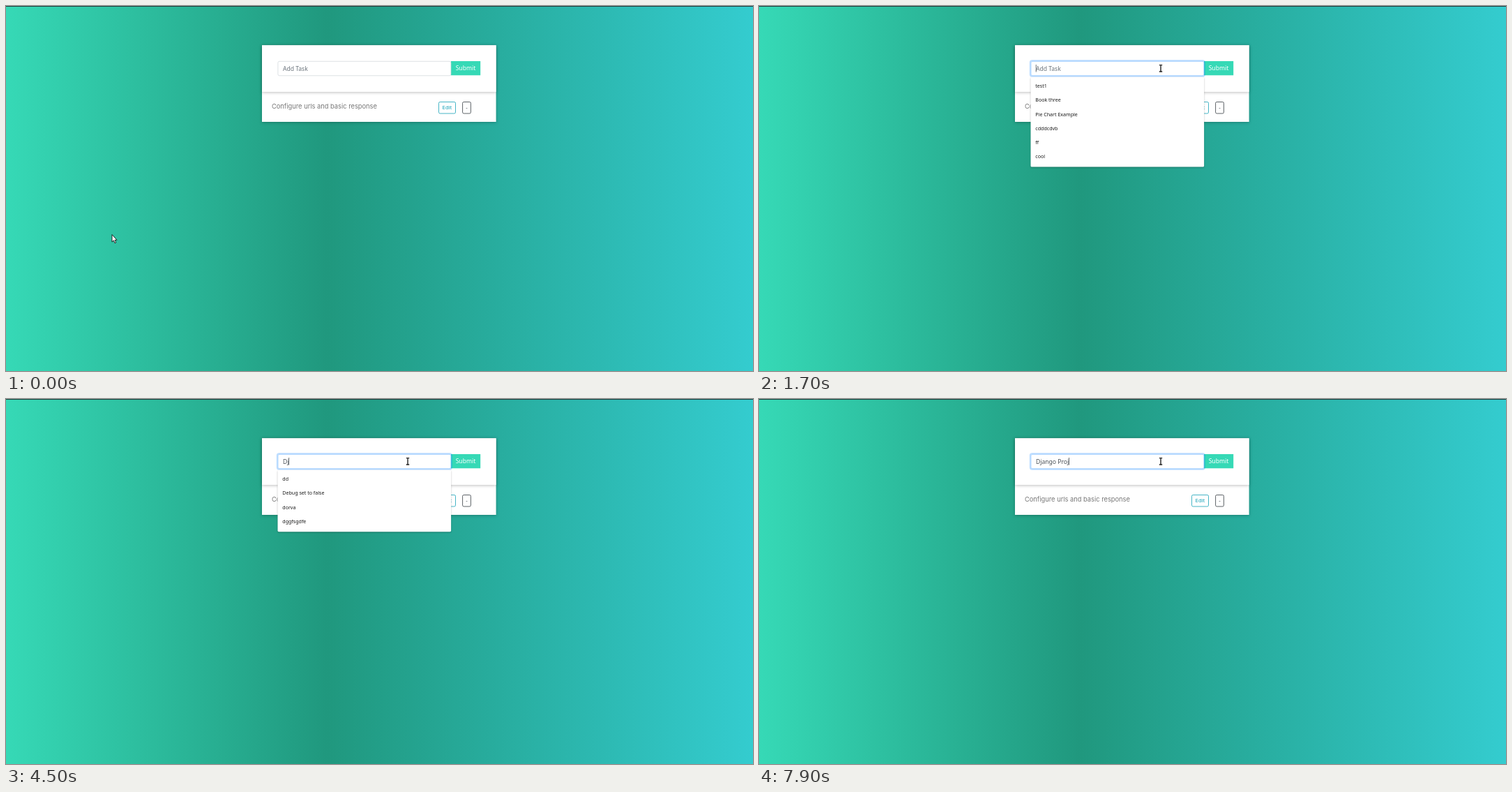
Animation, 1071 px wide and 523 px high, one loop 8000 ms. Source, as an HTML page:

```html
<!DOCTYPE html>
<html lang="en">
<head>
<meta charset="utf-8">
<title>Task list</title>
<style>
  html, body { margin: 0; width: 100%; height: 100%; overflow: hidden; }
  svg { display: block; width: 1071px; height: 523px; }
  text { font-family: "Noto Sans", "Open Sans", sans-serif; white-space: pre; }
  .field { font-size: 8.6px; }
  .small { font-size: 7.7px; }
  .option { font-size: 7.08px; fill: #1a1a1a; }
  .task { font-family: Inter, sans-serif; font-size: 9.3px; fill: #777; }
  .panel { fill: #fff; filter: drop-shadow(0 1.7px 2.2px rgba(0, 0, 0, .25)); }
  .popup { fill: #fff; filter: drop-shadow(0 1px 1px rgba(0, 0, 0, .25)); }
</style>
</head>
<body>
<svg viewBox="0 0 1071 523">
  <defs>
    <linearGradient id="sea">
      <stop offset="0" stop-color="#36d9b6"/>
      <stop offset=".43" stop-color="#20987e"/>
      <stop offset="1" stop-color="#34cccf"/>
    </linearGradient>
  </defs>
  <rect width="1071" height="523" fill="url(#sea)"/>
  <rect width="1071" height="1" fill="#243b3a"/>

  <rect class="panel" x="367" y="56.3" width="335.6" height="109.7"/>
  <rect class="panel" x="367" y="56.3" width="335.6" height="66.7"/>

  <text class="task" x="381" y="147.2">Configure urls and basic response</text>
  <g fill="none">
    <rect x="620.5" y="137.5" width="24" height="16.5" rx="1.8" stroke="#17a2b8" stroke-width=".8"/>
    <rect x="654.6" y="137.5" width="11.8" height="16.5" rx="1.8" stroke="#343a40" stroke-width=".8"/>
  </g>
  <text class="small" x="632.5" y="148.2" text-anchor="middle" fill="#17a2b8">Edit</text>
  <text class="small" x="660.5" y="148.2" text-anchor="middle" fill="#343a40">-</text>

  <rect x="638" y="79" width="42.2" height="20.3" fill="#36d9b6"/>
  <text class="field" x="659" y="92.1" text-anchor="middle" fill="#fff">Submit</text>

  <rect id="ring" x="388.7" y="78.1" width="250.3" height="22.8" rx="2.8" fill="none" stroke="#007bff" stroke-opacity=".25" stroke-width="1.8"/>
  <rect id="box" x="389.9" y="79.3" width="248" height="20.5" rx="2" fill="#fff" stroke-width=".7"/>
  <text id="value" class="field" x="396.9" y="92.6"></text>
  <rect id="caret" y="84" width=".8" height="10.6" fill="#495057"/>

  <g id="list">
    <rect id="popup" class="popup" x="389.5" y="101.8" width="248.6" rx="1.6"/>
    <g id="options"></g>
  </g>

  <path id="arrow" d="M0 0V10.6L2.4 8.4L4 12.2L5.7 11.5L4.1 7.8H7Z" fill="#fff" stroke="#111" stroke-width=".9" stroke-linejoin="round"/>
  <path id="beam" d="M573.8 84.6H575.3L576 85.1L576.7 84.6H578.2M573.8 94H575.3L576 93.5L576.7 94H578.2M576 85V93.6" fill="none" stroke="#222" stroke-width="1.4"/>
</svg>
<script>
const LOOP = 8000, STEP = 100;
const $ = id => document.getElementById(id);

const recent = ["test1", "Book three", "Pie Chart Example", "cdddcdvb", "ff", "cool"];
const matches = ["dd", "Debug set to false", "dorva", "dggfsgdfe"];

// start time, typed text, caret shown, suggestions
const states = [
  [0, "", false, []],
  [1600, "", true, []],
  [1700, "", true, recent],
  [2200, "", false, recent],
  [4000, "D", true, matches],
  [4500, "Dj", true, matches],
  [4600, "Dj", true, []],
  [4700, "Dja", true, []],
  [4800, "Djan", true, []],
  [5400, "Djang", true, []],
  [5500, "Django", true, []],
  [6000, "Django ", true, []],
  [6600, "Django P", true, []],
  [7200, "Django P", false, []],
  [7300, "Django Pr", true, []],
  [7500, "Django Pro", true, []],
  [7900, "Django Proj", true, []]
];

const pen = document.createElement("canvas").getContext("2d");
function textWidth(text) {
  pen.font = '86px "Noto Sans", "Open Sans", sans-serif';
  return pen.measureText(text).width / 10;
}

const bezier = (a, b, c, d, t) => {
  const u = 1 - t;
  return u * u * u * a + 3 * u * u * t * b + 3 * u * t * t * c + t * t * t * d;
};

const show = (id, on) => $(id).setAttribute("visibility", on ? "visible" : "hidden");

function set(id, attrs) {
  for (const key in attrs) $(id).setAttribute(key, attrs[key]);
}

function drawPointer(ms) {
  const tick = Math.floor(ms / STEP) * STEP;
  const t = Math.min(1, Math.max(0, (tick - 200) / 900));
  const x = bezier(152, 250, 870, 577, t);
  const y = bezier(327.5, 575, 280, 88.5, t);
  set("arrow", { transform: `translate(${x} ${y})` });
  show("arrow", ms < 1200);
  show("beam", ms >= 1200);
}

function drawState([start, text, caret, items]) {
  const focused = start >= 1700;
  $("value").textContent = text || "Add Task";
  set("value", { fill: text ? "#495057" : "#6c757d" });
  set("box", { stroke: focused ? "#80bdff" : "#ced4da" });
  set("caret", { x: 396.8 + textWidth(text) });
  show("ring", focused);
  show("caret", caret);
  show("list", items.length > 0);
  set("popup", { height: 7.8 + items.length * 20.15 });
  $("options").innerHTML = items.map((item, i) =>
    `<text class="option" x="396.3" y="${117.3 + i * 20.15}">${item}</text>`).join("");
}

let current;
function draw(ms) {
  drawPointer(ms);
  const state = states.filter(s => s[0] <= ms).pop();
  if (state !== current) drawState(current = state);
}

const origin = performance.now();
function frame() {
  draw((performance.now() - origin) % LOOP);
  requestAnimationFrame(frame);
}
frame();
</script>
</body>
</html>
```
